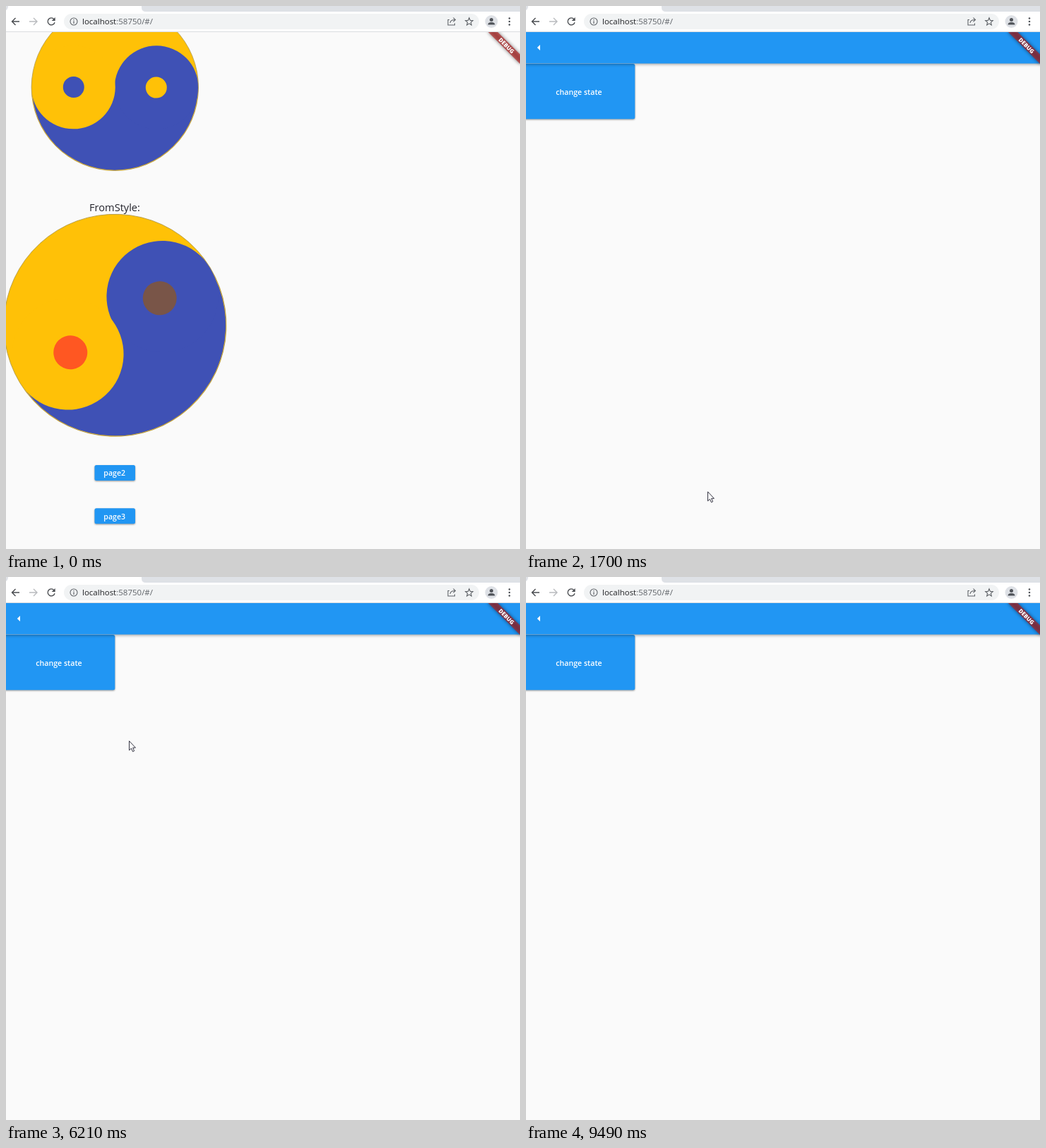
Animation of 728x770 px, one loop 9730 ms. Source, as an HTML page:

```html
<!DOCTYPE html>
<html lang="en">
<head>
<meta charset="utf-8">
<title>Page transition and overlay</title>
<style>
  html, body { margin: 0; width: 100%; height: 100%; overflow: hidden; background: #fafafa; }
  svg { display: block; font-family: "Open Sans", "Noto Sans", sans-serif; }
  .raised { filter: drop-shadow(0 1px 1.2px rgba(0, 0, 0, .4)); }
  .bar { filter: drop-shadow(0 1.5px 2px rgba(0, 0, 0, .4)); }
  .label { font-size: 10.6px; font-weight: 600; fill: #fff; text-anchor: middle; }
  .line { fill: none; stroke: #5f6368; stroke-width: 1.4; }
</style>
</head>
<body>
<svg id="stage" width="728" height="770" viewBox="0 0 728 770"></svg>
<script>
const LOOP = 9730;
const BLUE = '#2196f3', AMBER = '#ffc107', INDIGO = '#3f51b5';

const clamp = v => Math.min(1, Math.max(0, v));
const phase = (t, start, length) => clamp((t - start) / length);

function bezier(x1, y1, x2, y2) {
  const at = (a, b, u) => 3 * a * u * (1 - u) ** 2 + 3 * b * u * u * (1 - u) + u ** 3;
  return x => {
    let low = 0, high = 1;
    for (let i = 0; i < 24; i++) {
      const mid = (low + high) / 2;
      if (at(x1, x2, mid) < x) low = mid; else high = mid;
    }
    return at(y1, y2, low);
  };
}
const ease = bezier(.25, .1, .25, 1);
const easeIn = bezier(.42, 0, 1, 1);
const fastOutSlowIn = bezier(.4, 0, .2, 1);

// ---- markup helpers ----
// The left half and lower lobe take colour a, the right half and upper lobe colour b.
function yinYang({ id = '', x, y, r, angle = 0, a, b, dots, dotR, dotDist, rim, rimWidth }) {
  const lobe = (cy, fill) => `<circle cy="${cy}" r="${r * .502}" fill="${fill}"/>`;
  const dot = (cy, fill) => `<circle cy="${cy}" r="${dotR}" fill="${fill}"/>`;
  const inner = r - .8;
  return `<g transform="translate(${x} ${y})"><g id="${id}" transform="rotate(${angle})">
    <circle r="${r}" fill="${a}"/>
    <path d="M0 ${-inner}A${inner} ${inner} 0 0 1 0 ${inner}Z" fill="${b}"/>
    ${lobe(-r * .498, b)}${lobe(r * .498, a)}
    ${dot(-dotDist, dots[0])}${dot(dotDist, dots[1])}
    <circle r="${r}" fill="none" stroke="${rim}" stroke-width="${rimWidth}"/>
  </g></g>`;
}

function button(id, x, y, w, h, text, textX, textY) {
  const rect = `x="${x}" y="${y}" width="${w}" height="${h}" rx="2.5"`;
  return `<rect class="raised" ${rect} fill="${BLUE}"/>
    <clipPath id="${id}Clip"><rect ${rect}/></clipPath>
    <g clip-path="url(#${id}Clip)" fill="#fff">
      <rect id="${id}Hover" ${rect} opacity="0"/>
      <circle id="${id}Ripple" opacity="0"/>
    </g>
    <text class="label" x="${textX}" y="${textY}">${text}</text>`;
}

const browserBar = `
  <rect width="728" height="37" fill="#fff"/>
  <path d="M192 0V2Q192 8 198 8H728V0ZM0 0H3Q3 4 0 6Z" fill="#dee1e6"/>
  <path d="M0 36.5H728" stroke="#dadce0"/>
  <path class="line" d="M19 22H9M13.5 17 8.5 22 13.5 27" style="stroke:#4a4d51"/>
  <path class="line" d="M33 22H43.5M39 17 44 22 39 27" style="stroke:#b9bbbe"/>
  <path class="line" d="M68 18.6A5 5 0 1 0 69 23.2" style="stroke:#4a4d51"/>
  <path d="M69.7 16V21H64.7Z" fill="#4a4d51"/>
  <rect x="82" y="11" width="588" height="22" rx="11" fill="#f1f3f4"/>
  <circle class="line" cx="96" cy="22" r="5" style="stroke-width:1.1"/>
  <path class="line" d="M96 21.3V25M96 19V20.3" style="stroke-width:1.2"/>
  <text x="108" y="26" font-size="11.5" fill="#202124">localhost<tspan fill="#5f6368">:58750/#/</tspan></text>
  <path class="line" d="M628 19.5H626V27H635.5V24.5M629 24Q629.5 19.5 636 19.5M633.5 16.7 636.5 19.5 633.5 22.3" style="stroke-width:1.1"/>
  <path class="line" d="M656 16.8 657.5 20.4 661.3 20.7 658.4 23.2 659.3 27 656 24.9 652.7 27 653.6 23.2 650.7 20.7 654.5 20.4Z" style="stroke-width:1.1"/>
  <circle cx="687.5" cy="22" r="9" fill="#dee1e6"/>
  <circle cx="687.5" cy="19.4" r="2.5" fill="#50545a"/>
  <path d="M682.5 26.5Q682.5 23 687.5 23T692.5 26.5Z" fill="#50545a"/>
  <g fill="#50545a"><circle cx="713" cy="17.5" r="1.3"/><circle cx="713" cy="22" r="1.3"/><circle cx="713" cy="26.5" r="1.3"/></g>`;

// The corner ribbon lies on a 45 degree axis through the top right of the page.
const ribbon = `<clipPath id="pageClip"><rect y="37" width="728" height="733"/></clipPath>
  <g clip-path="url(#pageClip)"><g transform="translate(728 37) rotate(45)">
    <rect x="-32" y="22.3" width="64" height="9.5" opacity=".5" style="filter:blur(2.4px)"/>
    <rect x="-32" y="22.3" width="64" height="9.5" fill="#b71c1c" fill-opacity=".63"/>
    <text y="30" font-size="8" font-weight="800" fill="#fff" text-anchor="middle">DEBUG</text>
  </g></g>`;

const rim = { rim: '#b0984a', rimWidth: .8 };

document.getElementById('stage').innerHTML = `
  <rect width="728" height="770" fill="#fafafa"/>
  <g id="home">
    ${yinYang({ x: 154.3, y: 115.3, r: 118.2, angle: 90.3, a: AMBER, b: INDIGO,
      dots: [AMBER, INDIGO], dotR: 15, dotDist: 58.5, ...rim })}
    <text x="154" y="291" font-size="14.6" fill="#23232b" text-anchor="middle">FromStyle:</text>
    ${yinYang({ x: 154.5, y: 452.8, r: 157.5, angle: 58.7, a: AMBER, b: INDIGO,
      dots: ['#795548', '#ff5722'], dotR: 24, dotDist: 74, ...rim })}
    ${button('page2', 125.5, 651, 57.5, 22, 'page2', 153.7, 666)}
    ${button('page3', 125.5, 712.3, 57.5, 22, 'page3', 153.7, 727.7)}
  </g>
  <g id="detail">
    <rect y="37" width="728" height="733" fill="#fafafa"/>
    ${button('change', -4, 82, 158.3, 78.3, 'change state', 75, 125.7)}
    <rect class="bar" x="-5" y="37" width="738" height="44.5" fill="${BLUE}"/>
    <path d="M20 55V63L15.8 59Z" fill="#fff"/>
  </g>
  <g id="overlay">
    <rect y="37" width="728" height="733" fill="#90caf9" opacity=".5"/>
    ${yinYang({ id: 'spinner', x: 363.5, y: 405.5, r: 39, a: '#000', b: '#fff',
      dots: ['#000', '#fff'], dotR: 5.2, dotDist: 19, rim: '#000', rimWidth: 1 })}
  </g>
  ${ribbon}
  ${browserBar}
  <path id="cursor" d="M.5 .5V13.6L3.4 10.9 5.5 15.5 7.6 14.5 5.6 10H9.4Z" fill="#fff" stroke="#1c1c2c" stroke-width=".9"/>`;

// ---- timeline ----
const cursorPath = [
  [150, 664, 404], [520, 265, 665], [840, 156, 727], [1550, 156, 727], [1700, 257, 689],
  [2080, 264, 432], [2640, 77, 133], [3200, 77, 133], [3780, 420, 473], [5500, 420, 473],
  [5720, 456, 520], [6380, 77, 133], [6800, 77, 133], [7060, 489, 518], [7300, 489, 522],
  [8800, 489, 522], [9460, 470, 772]
];
const homePress = { down: 1160, up: 1390 };
const changePresses = [{ down: 2870, up: 3018 }, { down: 6530, up: 6678 }];

function cursorAt(t) {
  const next = cursorPath.findIndex(point => point[0] > t);
  if (next === 0) return cursorPath[0].slice(1);
  if (next < 0) return cursorPath.at(-1).slice(1);
  const [t0, x0, y0] = cursorPath[next - 1], [t1, x1, y1] = cursorPath[next];
  const k = (t - t0) / (t1 - t0);
  return [x0 + (x1 - x0) * k, y0 + (y1 - y0) * k];
}

const set = (id, attributes) => {
  const node = document.getElementById(id);
  for (const name in attributes) node.setAttribute(name, attributes[name]);
};

// A ripple grows slowly while held, fast after release, and drifts to the button centre.
function drawRipple(id, t, { down, up }, from, centre, reach) {
  const grown = clamp(phase(t, down, 1000) * (t < up ? 1 : 0) + (t < up ? 0 : (up - down) / 1000 + (t - up) / 225));
  const k = ease(grown);
  set(id + 'Ripple', {
    cx: from[0] + (centre[0] - from[0]) * k,
    cy: from[1] + (centre[1] - from[1]) * k,
    r: reach * (.3 + .7 * k),
    opacity: .24 * phase(t, down, 75) * (1 - phase(t, up, 375))
  });
}

const inside = ([x, y], left, top, right, bottom) => x >= left && x <= right && y >= top && y <= bottom;

function draw(t) {
  const cursor = cursorAt(t);
  set('cursor', { transform: `translate(${cursor})`, opacity: t < 150 || t >= 9460 ? 0 : 1 });

  set('page3Hover', { opacity: inside(cursor, 126, 712, 183, 735) ? .08 : 0 });
  set('changeHover', { opacity: inside(cursor, 0, 82, 154, 160) ? .08 : 0 });
  drawRipple('page3', t, homePress, [156, 727], [154, 723], 34);

  const press = changePresses[t < 6000 ? 0 : 1];
  drawRipple('change', t, press, [77, 133], [75, 121], 93);

  const slide = phase(t, homePress.up, 300);
  set('detail', {
    opacity: easeIn(slide),
    transform: `translate(0 ${183 * (1 - fastOutSlowIn(slide))})`
  });

  const shown = Math.max(0, t - press.up);
  set('overlay', { opacity: phase(shown, 0, 200) * (1 - phase(shown, 2000, 300)) });
  set('spinner', { transform: `rotate(${.121 * shown ** .79})` });
}

function tick() {
  draw(performance.now() % LOOP);
  requestAnimationFrame(tick);
}
tick();
</script>
</body>
</html>
```
